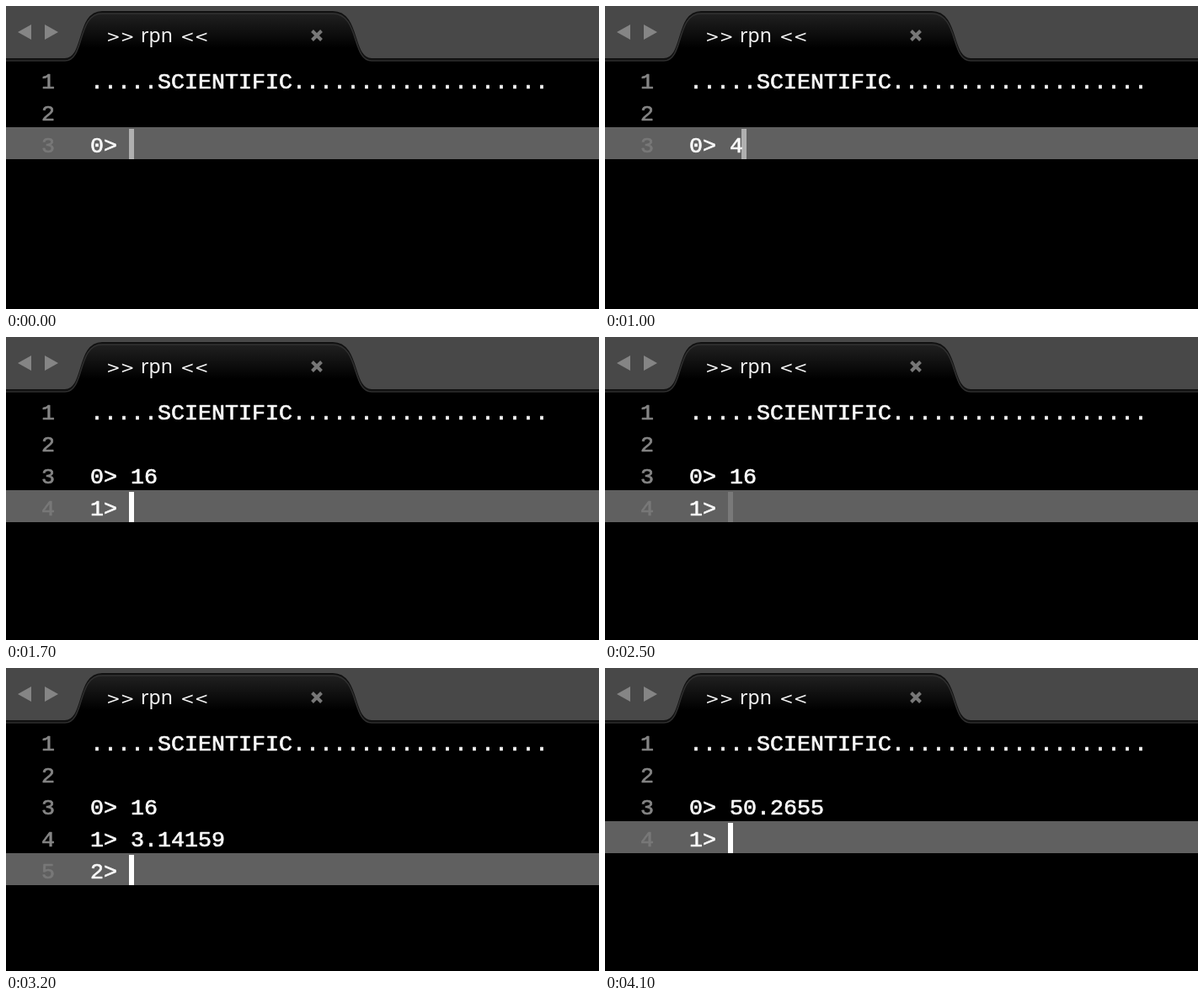
An HTML page with a canvas for the animation above (4200 ms loop, 704 by 360 pixels).

```html
<!DOCTYPE html>
<html lang="en">
<meta charset="utf-8">
<title>rpn</title>
<style>
  html, body { margin: 0; width: 704px; height: 360px; overflow: hidden; background: #000; }
  canvas { display: block; }
</style>
<canvas id="stage" width="704" height="360"></canvas>
<script>
const ctx = document.getElementById('stage').getContext('2d');
const LOOP = 4200, STEP = 100;
const ROW_TOP = 68, ROW_HEIGHT = 38, CELL = 16, TEXT_X = 100;
const HEADER = '.....SCIENTIFIC' + '.'.repeat(19);

// Each key press: its time, the stack after it and the entry being typed.
const keys = [
  { at: -600, stack: [], entry: '' },
  { at: 400, stack: [], entry: '4' },
  { at: 1200, stack: ['4'], entry: '' },
  { at: 1700, stack: ['16'], entry: '' },
  { at: 3200, stack: ['16', '3.14159'], entry: '' },
  { at: 4100, stack: ['50.2655'], entry: '' },
];

const smooth = x => {
  x = Math.min(1, Math.max(0, x));
  return x * x * (3 - 2 * x);
};

// The caret stays lit after a key press, then fades out and in once a second.
function caretAlpha(elapsed) {
  const phase = elapsed % 1000;
  return phase < 720 ? 1 - smooth((phase - 500) / 200) : smooth((phase - 750) / 200);
}

function rect(color, x, y, w, h) {
  ctx.fillStyle = color;
  ctx.fillRect(x, y, w, h);
}

function polygon(color, ...points) {
  ctx.fillStyle = color;
  ctx.beginPath();
  for (const [x, y] of points) ctx.lineTo(x, y);
  ctx.fill();
}

function label(text, x, font) {
  ctx.font = font;
  ctx.fillStyle = '#f4f4f4';
  ctx.fillText(text, x, 43);
}

function mono(text, x, row, color) {
  const y = ROW_TOP + row * ROW_HEIGHT + 30;
  ctx.font = '26.66px "Liberation Mono", monospace';
  ctx.fillStyle = ctx.strokeStyle = color;
  ctx.lineWidth = 0.7;
  ctx.lineJoin = 'round';
  ctx.fillText(text, x, y);
  ctx.strokeText(text, x, y);
}

function tabPath(inset) {
  ctx.beginPath();
  ctx.moveTo(0, 63 + inset);
  ctx.lineTo(70, 63 + inset);
  ctx.bezierCurveTo(94, 63 + inset, 84, 7 + inset, 114, 7 + inset);
  ctx.lineTo(388, 7 + inset);
  ctx.bezierCurveTo(420, 7 + inset, 410, 63 + inset, 434, 63 + inset);
  ctx.lineTo(704, 63 + inset);
}

function drawTabBar() {
  rect('#484848', 0, 0, 704, 63);
  const shade = ctx.createLinearGradient(0, 7, 0, 50);
  shade.addColorStop(0, '#222');
  shade.addColorStop(1, '#000');
  tabPath(0);
  ctx.fillStyle = shade;
  ctx.fill();
  ctx.lineWidth = 2;
  ctx.strokeStyle = '#111';
  ctx.stroke();
  tabPath(2);
  ctx.lineWidth = 1.5;
  ctx.strokeStyle = '#303030';
  ctx.stroke();

  polygon('#858585', [14, 31], [30, 22], [30, 40]);
  polygon('#858585', [62, 31], [46, 22], [46, 40]);

  label('>>', 119, '20px "DejaVu Sans", sans-serif');
  label('rpn', 160, '500 23px "Noto Sans", sans-serif');
  label('<<', 207, '20px "DejaVu Sans", sans-serif');

  ctx.strokeStyle = '#777';
  ctx.lineWidth = 4;
  ctx.beginPath();
  ctx.moveTo(363.5, 29.5);
  ctx.lineTo(374.5, 40.5);
  ctx.moveTo(374.5, 29.5);
  ctx.lineTo(363.5, 40.5);
  ctx.stroke();
}

function draw(time) {
  const { at, stack, entry } = keys.findLast(key => key.at <= time);
  const active = stack.length + 2;
  const lines = [HEADER, '', ...[...stack, entry].map((value, i) => `${i}> ${value}`)];

  rect('#000', 0, 0, 704, 360);
  drawTabBar();
  rect('#606060', 0, ROW_TOP + active * ROW_HEIGHT, 704, ROW_HEIGHT);
  lines.forEach((line, row) => {
    mono(row + 1, 42, row, row === active ? '#787878' : '#858585');
    mono(line, TEXT_X, row, '#f8f8f8');
  });

  ctx.globalAlpha = caretAlpha(time - at);
  rect('#fff', TEXT_X + lines[active].length * CELL - 2, ROW_TOP + active * ROW_HEIGHT + 2, 6, 36);
  ctx.globalAlpha = 1;
}

function tick() {
  const time = performance.now() % LOOP;
  draw(Math.floor(time / STEP) * STEP);
  requestAnimationFrame(tick);
}
tick();
</script>
</html>
```
